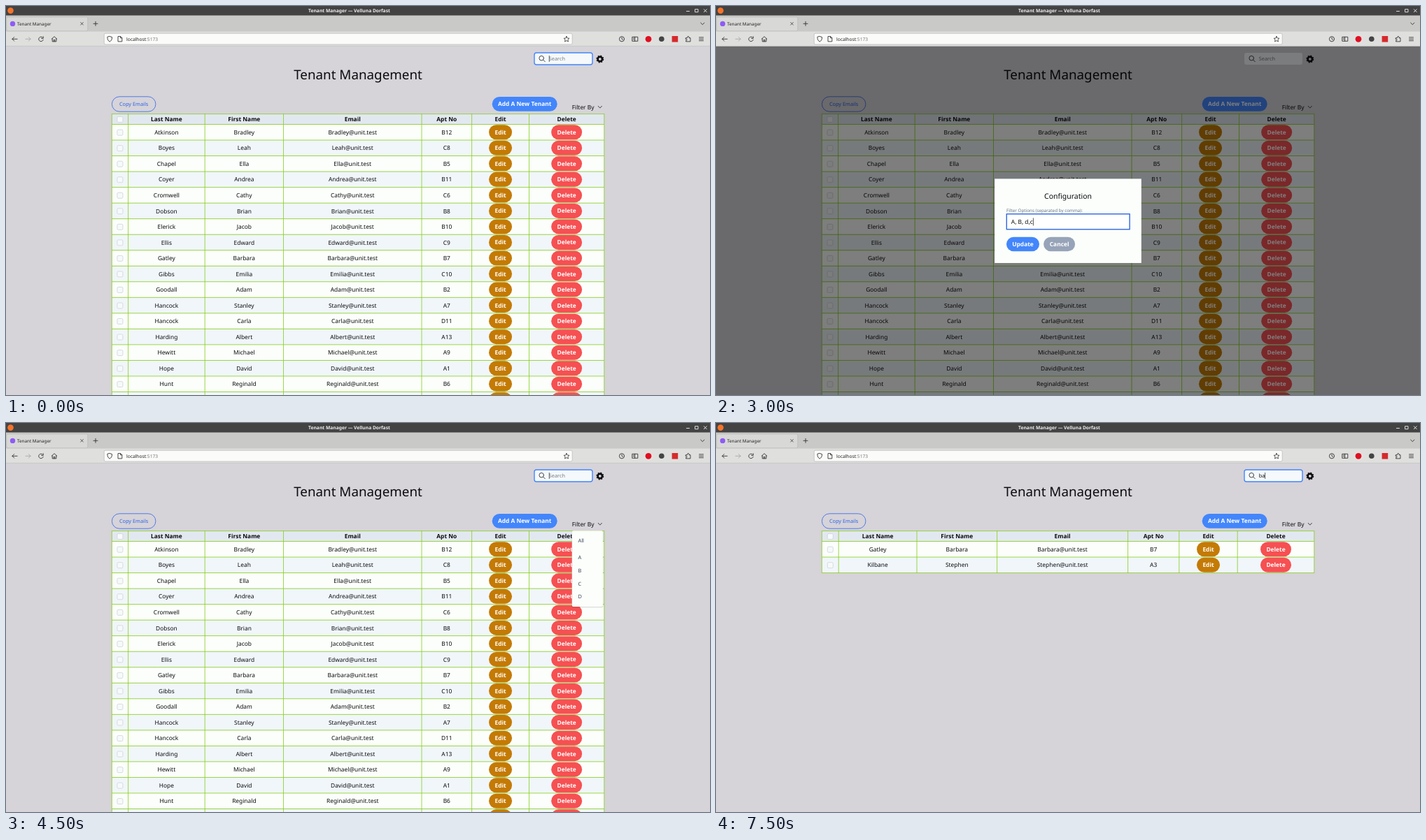
An HTML page that plays this animation: 1006x557 px, repeating every 8000 ms.

```html
<!DOCTYPE html>
<html lang="en">
<head>
<meta charset="utf-8">
<title>Tenant Manager</title>
<style>
html, body { margin: 0; width: 100%; height: 100%; overflow: hidden; background: #d6d3d9 }
svg { display: block; width: 1006px; height: 557px; font-family: "Noto Sans", sans-serif; text-rendering: geometricPrecision }
.mid { text-anchor: middle }
.b { font-weight: 700 }
.ico { fill: none; stroke: #333; stroke-width: .9; stroke-linecap: round; stroke-linejoin: round }
</style>
</head>
<body>
<svg viewBox="0 0 1006 557"><g id="page"></g><g id="chrome"></g></svg>
<script>
const BLUE = '#4386fb', PAPER = '#fbfefb', LIME = '#86cd1a', RED = '#f65052', AMBER = '#c47a04';
const TOP = 154.6, BODY = 169.5, ROW = 22.53;

const tenants = `Atkinson Bradley B12,Boyes Leah C8,Chapel Ella B5,Coyer Andrea B11,Cromwell Cathy C6,
Dobson Brian B8,Elerick Jacob B10,Ellis Edward C9,Gatley Barbara B7,Gibbs Emilia C10,Goodall Adam B2,
Hancock Stanley A7,Hancock Carla D11,Harding Albert A13,Hewitt Michael A9,Hope David A1,Hunt Reginald B6,
Hunt Chelsea D1,Irons Catherine D7,Jennings Anthony D2,Johnson Janet A6,Kilbane Stephen A3,Kilroy Cecil A11,
Maltby Jane A4,O'Grady Eleanor A2,Patel Deborah A10,Travis Irene A12,Wagstaff Abby A8,Wyatt Simeon A5`
  .split(/,\s*/).map(line => line.split(' '));

const aptNumber = tenant => +tenant[2].slice(1);
const blockA = tenants.filter(t => t[2][0] === 'A').sort((a, b) => aptNumber(a) - aptNumber(b));
const matches = tenants.filter(t => /ba/i.test(t[0] + ' ' + t[1]));

const wideCols = [151.3, 174.6, 284.2, 396.5, 594, 665.6, 747.5, 854.8];
const blockCols = [151.3, 174.7, 286.4, 400, 590.2, 663, 745.6, 854.8];
const matchCols = [151.3, 175.2, 287, 401.6, 588.6, 661.8, 745.2, 854.8];

const scenes = [
  { focus: true },
  { scroll: 59.7 },
  { modal: true },
  { focus: true, menu: true },
  { rows: blockA, cols: blockCols },
  { rows: matches, cols: matchCols, focus: true, query: 'ba' }
];

// y is the middle of the capital letters
const text = (s, x, y, size = 8.38, cls = '', fill = '#0c0c0e') =>
  `<text x="${x}" y="${y + size * .36}" font-size="${size}" class="${cls}" fill="${fill}">${s}</text>`;
const rect = (x, y, w, h, fill, r = 0, extra = '') =>
  `<rect x="${x}" y="${y}" width="${w}" height="${h}" rx="${r}" fill="${fill}" ${extra}/>`;
const line = (x1, y1, x2, y2, color = LIME, w = .8) =>
  `<path d="M${x1} ${y1}L${x2} ${y2}" stroke="${color}" stroke-width="${w}"/>`;
const dot = (x, y, r, fill) => `<circle cx="${x}" cy="${y}" r="${r}" fill="${fill}"/>`;
const icon = (x, y, d, extra = '') =>
  `<path class="ico" transform="translate(${x} ${y})" d="${d}" ${extra}/>`;
const pill = (label, x, y, w, h, fill) =>
  rect(x - w / 2, y - h / 2, w, h, fill, h / 2) + text(label, x, y, 8.38, 'mid b', '#fff');
const checkbox = (x, y) => rect(x - 4, y - 3.9, 8, 8, '#f7fafa', 1.6, 'stroke="#d0d4d8" stroke-width=".8"');

function table(rows, cols) {
  const left = cols[0], width = cols[7] - left, bottom = BODY + rows.length * ROW;
  const mid = cols.slice(1).map((x, i) => (x + cols[i]) / 2);
  let out = rect(left, TOP, width, BODY - TOP, '#e2e8f0');
  rows.forEach((_, i) => out += rect(left, BODY + i * ROW, width, ROW, i % 2 ? '#f0f6fa' : PAPER));
  out += line(left, TOP, cols[7], TOP);
  for (let i = 0; i <= rows.length; i++) out += line(left, BODY + i * ROW, cols[7], BODY + i * ROW);
  cols.forEach(x => out += line(x, TOP - .4, x, bottom + .4));
  out += checkbox(mid[0], 162.3);
  ['Last Name', 'First Name', 'Email', 'Apt No', 'Edit', 'Delete']
    .forEach((s, i) => out += text(s, mid[i + 1], 162.2, 8.38, 'mid b'));
  rows.forEach(([last, first, apt], i) => {
    const y = BODY + (i + .5) * ROW;
    out += checkbox(mid[0], y + .3);
    [last, first, first + '@unit.test', apt].forEach((s, k) => out += text(s, mid[k + 1], y + .1, 8.38, 'mid'));
    out += pill('Edit', mid[5], y, 33, 21, AMBER) + pill('Delete', mid[6], y, 44, 21, RED);
  });
  return out;
}

function searchBox({ focus, query }) {
  const ring = focus ? `stroke="${BLUE}" stroke-width="1.4"` : '';
  return rect(755, 67, 83, 17, '#f5f9fc', 3, ring)
    + icon(765.5, 75, 'M2.3 2.3L4.8 4.8M3 -.3A3.3 3.3 0 1 1 -3.6 -.3A3.3 3.3 0 1 1 3 -.3')
    + text(query || 'Search', 775.8, 75.4, 7.33, '', query ? '#111' : '#777d86')
    + (focus ? line(query ? 784.6 : 776.3, 71, query ? 784.6 : 776.3, 80, '#222', .7) : '');
}

const gear = `<g fill="none" stroke="#0c0c0e" transform="translate(848.8 76)">
  <circle r="3.2" stroke-width="2.6"/><circle r="4.6" stroke-width="1.7" stroke-dasharray="1.9 1.713"/></g>`;

const filterMenu = () => rect(808.2, 155, 45.2, 109.2, '#0002', 2) + rect(808.7, 154.3, 44.2, 108.6, PAPER, 2)
  + ['All', 'A', 'B', 'C', 'D'].map((s, i) => text(s, 817.5, i ? 173.4 + 18.85 * i : 168.6, 7.33, '', '#374151')).join('');

const modal = () => rect(0, 57, 1006, 500, 'rgb(0 0 0 / .5)') + rect(398.2, 247.4, 209.6, 120.6, PAPER)
  + text('Configuration', 503, 271.8, 10.48, 'mid')
  + text('Filter Options (separated by comma):', 415, 292.8, 6.29, '', '#6b7280')
  + rect(415.3, 297.8, 175.8, 22, '#fff', 0, 'stroke="#2f66e4" stroke-width="1.4"')
  + text('A, B, d,c', 421.8, 309.2) + line(453.4, 303.5, 453.4, 314.5, '#111', .7)
  + pill('Update', 438.5, 341, 47, 20.6, BLUE) + pill('Cancel', 490.6, 341, 45, 20.6, '#97a3b8');

function page(scene) {
  const { rows = tenants.slice(0, 20), cols = wideCols, scroll = 0 } = scene;
  return rect(0, 57, 1006, 500, '#d6d3d9') + `<g transform="translate(0 ${-scroll})">`
    + searchBox(scene) + gear
    + text('Tenant Management', 503, 98.6, 18.8, 'mid')
    + rect(151.4, 129.8, 62.5, 21.4, 'none', 10.7, 'stroke="#2f66e4" stroke-width=".8"')
    + text('Copy Emails', 182.6, 140.6, 7.33, 'mid', '#2f66e4')
    + pill('Add A New Tenant', 741.2, 140.3, 93, 20.8, BLUE)
    + text('Filter By', 808.7, 144.8)
    + icon(848.8, 144.7, 'M-2.6 -1.4L0 1.4L2.6 -1.4')
    + table(rows, cols) + '</g>'
    + (scroll ? dot(977.2, 500.4, 15.5, BLUE)
      + icon(977.2, 499.8, 'M-5.2 2.6L0 -2.6L5.2 2.6', 'style="stroke:#e6e8ee;stroke-width:2.8;stroke-linecap:butt;stroke-linejoin:miter"') : '')
    + (scene.menu ? filterMenu() : '')
    + (scene.modal ? modal() : '');
}

function browser() {
  const light = 'style="stroke:#eee"';
  return rect(0, 0, 1006, 14, '#434343') + dot(6.5, 6.6, 4.3, '#f5732a')
    + text('Tenant Manager — Velluna Dorfast', 490.5, 6.7, 6.7, 'mid b', '#f0f0f0')
    + icon(974.5, 7, 'M-2 .5H2', light) + icon(987, 6.7, 'M-2 -2H2V2H-2Z', light) + icon(999.3, 6.7, 'M-2 -2L2 2M2 -2L-2 2', light)
    + rect(0, 13.5, 1006, 23.5, '#c9cac8')
    + rect(.8, 15.8, 116, 20, '#d8d9d7', 2, 'stroke="#b4b5b3" stroke-width=".6"')
    + dot(9.5, 25.4, 3.7, '#8f5bf5') + text('Tenant Manager', 16, 25.5, 6.3, '', '#222')
    + icon(108.5, 25.3, 'M-1.8 -1.8L1.8 1.8M1.8 -1.8L-1.8 1.8', 'style="stroke-width:.8"')
    + icon(128, 25.3, 'M-3 0H3M0 -3V3') + icon(995.3, 25.3, 'M-2.6 -1.2L0 1.3L2.6 -1.2')
    + rect(0, 36.6, 1006, 21, '#dfe0de') + line(0, 57.4, 1006, 57.4, '#bfc0be', .7)
    + icon(12.5, 47.3, 'M3.6 0H-3.6M-.8 -2.8L-3.6 0L-.8 2.8')
    + icon(31.5, 47.3, 'M-3.6 0H3.6M.8 -2.8L3.6 0L.8 2.8', 'style="stroke:#aaa"')
    + icon(50, 47.4, 'M3.2 1A3.3 3.3 0 1 1 2.4 -2.3M3.2 -3.6V-1H.6')
    + icon(69, 47.3, 'M-3.8 0L0 -3.6L3.8 0M-2.8 -.6V3.6H2.8V-.6M-.8 3.4V1H.8V3.4')
    + rect(140.2, 39.2, 669, 15.8, '#fbfbfa', 2, 'stroke="#b6b7b5" stroke-width=".7"')
    + icon(148.2, 47.2, 'M0 -3.7L3.3 -2.6C3.4 1 2 2.8 0 3.9C-2 2.8 -3.4 1 -3.3 -2.6Z')
    + icon(163, 47.2, 'M-2.6 -3.6H.8L2.8 -1.6V3.7H-2.6ZM.6 -3.4V-1.4H2.6')
    + text('localhost<tspan fill="#777">:5173</tspan>', 172, 47.2, 6.65, '', '#222')
    + icon(801, 47.4, 'M0 -4L1.2 -1.4L4 -1.1L1.9 .8L2.5 3.6L0 2.2L-2.5 3.6L-1.9 .8L-4 -1.1L-1.2 -1.4Z', 'style="stroke-width:.8"')
    + icon(880, 47.3, 'M3.6 0A3.6 3.6 0 1 1 -3.6 0A3.6 3.6 0 1 1 3.6 0M0 -2V0L1.5 1')
    + icon(899, 47.3, 'M-3.8 -3H3.8V3H-3.8ZM-.4 -3V3M-2.6 -1.2H-1.8M-2.6 .6H-1.8')
    + dot(918, 47.3, 4.4, '#e00f22') + dot(936.8, 47.3, 3.8, '#444')
    + rect(951.6, 43, 8.6, 8.6, '#d62a2c')
    + icon(975, 47.3, 'M-3.4 -1.6H-1.4V-2.6A1.2 1.2 0 0 1 1 -2.6V-1.6H3V3.6H-3.4V2H-2.4A1 1 0 0 0 -2.4 .2H-3.4Z')
    + icon(993.5, 47.3, 'M-3 -2.4H3M-3 0H3M-3 2.4H3');
}

const pageNode = document.getElementById('page');
document.getElementById('chrome').innerHTML = browser();
let shown = -1;

function tick(now) {
  const index = Math.floor(now % 8000 / 1500);
  if (index !== shown) pageNode.innerHTML = page(scenes[shown = index]);
  requestAnimationFrame(tick);
}
tick(performance.now());
</script>
</body>
</html>
```
